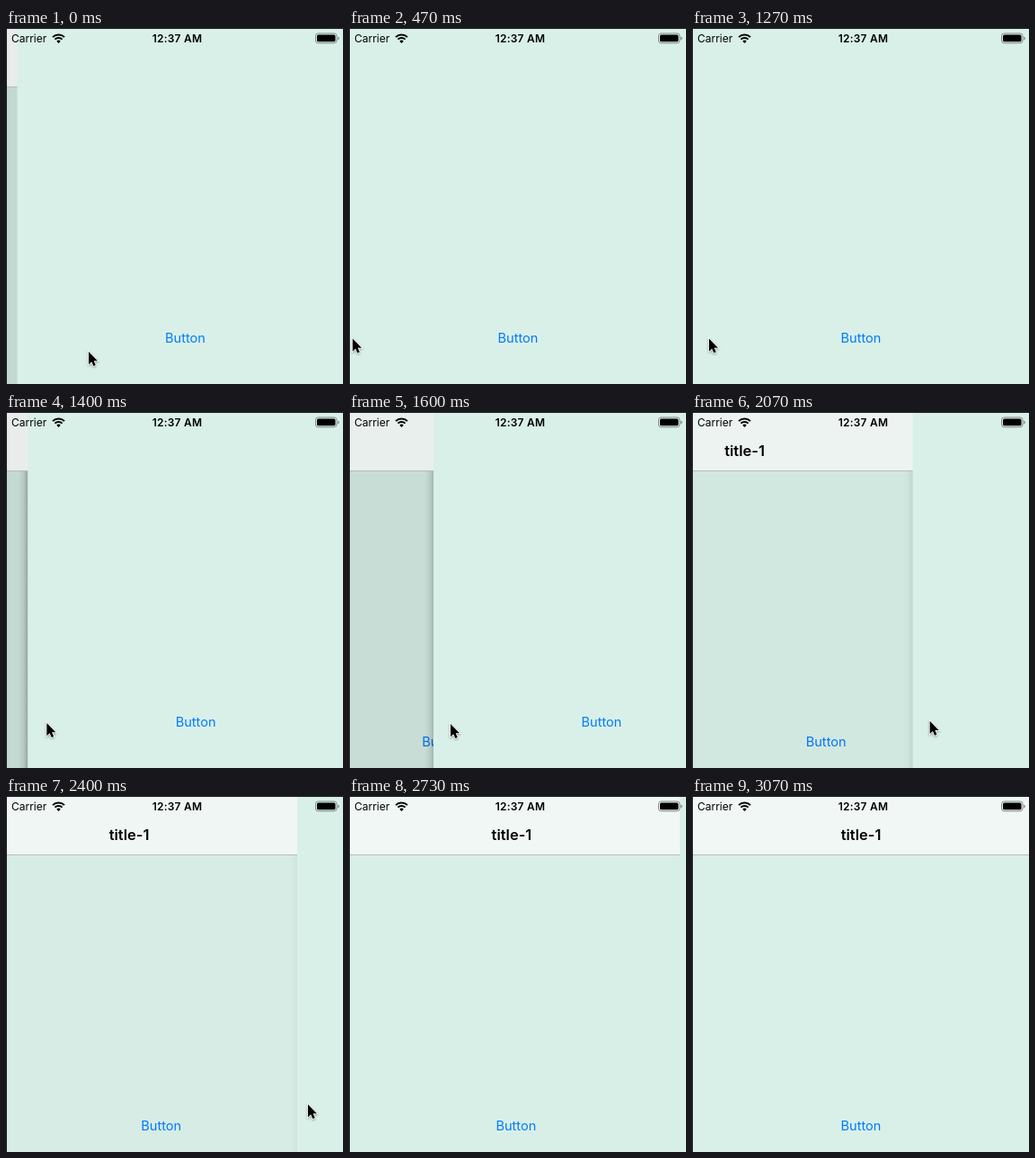
These frames come from a looping animation (375 px wide and 396 px high, 3.74 s). An HTML page:

```html
<!DOCTYPE html>
<html lang="en">
<head>
<meta charset="utf-8">
<title>Swipe back</title>
<style>
  html, body { margin: 0; width: 100%; height: 100%; overflow: hidden; }
  body { position: relative; background: #d9f0e8; color: #000; font-family: Inter, Roboto, sans-serif; }
  .stage { position: absolute; left: 0; top: 0; width: 375px; height: 396px; overflow: hidden; --x: 0; --shade: 0; }
  .stage > *, .label, .shadow { position: absolute; }
  .fill { left: 1px; top: 1px; width: 374px; height: 395px; background: #d9f0e8; }

  /* --x is how far the front page has been pulled right, 0 to 374 */
  .back .label { transform: translateX(calc((var(--x) - 374) * .3px)); }
  .dim { background: #000; opacity: calc((374 - var(--x)) / 374 * .105); }
  .nav { left: 1px; top: 1px; width: 374px; height: 64px; background: #f1f7f5; border-bottom: 1px solid #b3bdb9; box-sizing: content-box; }
  .nav i { position: absolute; inset: 0; background: #000; opacity: calc((374 - var(--x)) / 374 * .04); }
  .title { left: 1px; top: 31px; width: 374px; font: 600 16.5px/24px Inter, Roboto, sans-serif; text-align: center;
    transform: translateX(calc((var(--x) - 374) * 1px)); }
  .front { transform: translateX(calc(var(--x) * 1px)); }
  .shadow { left: -10px; top: 65px; width: 10px; bottom: 0; opacity: calc(var(--shade) * (374 - var(--x)) / 374);
    background: linear-gradient(to left, rgba(0, 0, 0, .24), rgba(0, 0, 0, .07) 50%, transparent); }

  .label { left: 0; width: 374px; font-size: 14.6px; line-height: 20px; text-align: center; color: #007aff; }
  .front .label { top: 334px; }
  .back .label { top: 356px; }

  .carrier, .clock { top: 4px; font-size: 12px; line-height: 15px; white-space: nowrap; }
  .carrier { left: 6px; }
  .clock { left: 3px; width: 375px; text-align: center; font-weight: 600; letter-spacing: .2px; }
  .edge { inset: 0; border: solid #1c1f1e; border-width: 1px 0 0 1px; }
  svg { left: 0; top: 0; overflow: visible; }
  .cursor { filter: drop-shadow(0 1px 1px rgba(0, 0, 0, .35)); }
</style>
</head>
<body>
<div class="stage" id="stage">
  <div class="fill back"><div class="label">Button</div></div>
  <div class="fill dim"></div>
  <div class="nav"><i></i></div>
  <div class="title">title-1</div>
  <div class="fill front"><div class="shadow"></div><div class="label">Button</div></div>

  <div class="carrier">Carrier</div>
  <div class="clock">12:37 AM</div>
  <svg width="375" height="24">
    <g fill="none" stroke="#000" stroke-width="2">
      <path d="M52 10.1a9.2 9.2 0 0 1 13 0M54.4 12.6a5.8 5.8 0 0 1 8.2 0"/>
    </g>
    <path d="M58.5 17l-2.2-2.3a3.1 3.1 0 0 1 4.4 0z"/>
    <rect x="344.5" y="6" width="23.5" height="10.8" rx="2.8" fill="none" stroke="#7f8b87"/>
    <rect x="346" y="7.5" width="20.5" height="7.8" rx="1.5"/>
    <path d="M369.2 9.4q1.6.5 1.6 2t-1.6 2z" fill="#7f8b87"/>
  </svg>
  <div class="edge"></div>
  <svg class="cursor" id="cursor" width="12" height="18">
    <path d="M0 0V14.2L3.2 11.2L5.4 16L7.8 15L5.7 10.3H10Z" stroke="#fff" stroke-width="1.6" paint-order="stroke"/>
  </svg>
</div>
<script>
  const LOOP = 3740, TICK = 200 / 3, POP_START = 1267;
  const stage = document.getElementById('stage');
  const cursor = document.getElementById('cursor');

  // [ms, value] points
  const pull = curve([[0, 11.5], [67, 6], [133, 2.8], [200, 1], [267, 0], [1267, 0],
    [1600, 93], [1800, 157], [1867, 184], [2333, 311], [2400, 323], [2667, 361], [2867, 374]]);
  const cursorX = curve([[0, 92], [467, 4], [533, -9], [600, -16], [733, -16], [800, -6],
    [1000, 8], [1267, 19], [1600, 113], [1867, 209], [2400, 336], [2867, 385]]);
  const cursorY = curve([[0, 360], [467, 345.5], [1267, 345.5], [1600, 347], [1867, 344.5], [2400, 343]]);

  // Cubic through the points that never overshoots them
  function curve(points) {
    const slope = i => (points[i + 1][1] - points[i][1]) / (points[i + 1][0] - points[i][0]);
    const last = points.length - 1;
    const tangent = points.map((_, i) => {
      if (i === 0) return slope(0);
      if (i === last) return 0;
      const a = slope(i - 1), b = slope(i);
      return a * b > 0 ? 2 * a * b / (a + b) : 0;
    });
    return t => {
      if (t >= points[last][0]) return points[last][1];
      let i = 0;
      while (t >= points[i + 1][0]) i++;
      const [t0, v0] = points[i], [t1, v1] = points[i + 1];
      const h = t1 - t0, u = (t - t0) / h, w = 1 - u;
      return v0 * w * w * (1 + 2 * u) + v1 * u * u * (3 - 2 * u)
        + h * u * w * (w * tangent[i] - u * tangent[i + 1]);
    };
  }

  function draw(now) {
    // The screen updates 15 times a second
    const t = Math.floor((now % LOOP + 3.4) / TICK) * TICK;
    stage.style.setProperty('--x', pull(t).toFixed(2));
    stage.style.setProperty('--shade', t > POP_START ? 1 : 0);
    cursor.style.transform = `translate(${cursorX(t).toFixed(2)}px, ${cursorY(t).toFixed(2)}px)`;
  }

  const start = performance.now();
  function loop() {
    draw(performance.now() - start);
    requestAnimationFrame(loop);
  }
  loop();
</script>
</body>
</html>
```
